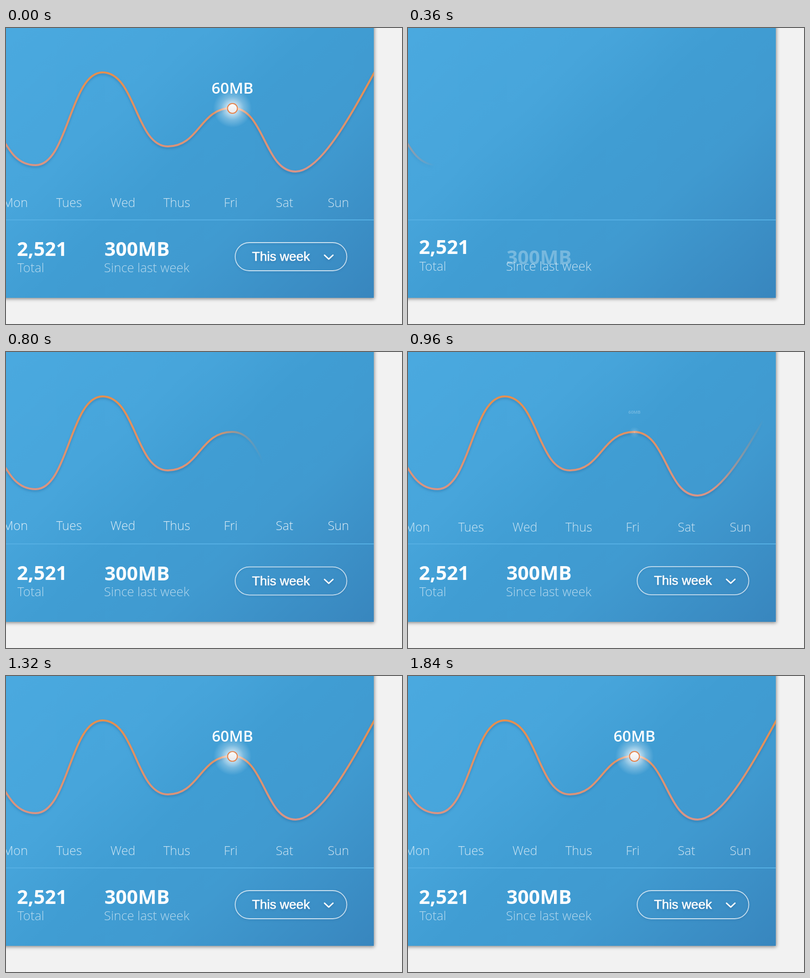
Recreate the animation shown at these times as an HTML page. Size 800 px wide and 600 px high, loop 2080 ms.

```html
<!DOCTYPE html>
<html lang="en">
<head>
<meta charset="utf-8">
<title>Weekly usage</title>
<style>
  html, body { margin: 0; width: 100%; height: 100%; overflow: hidden; background: #f2f2f2; }
  .card {
    position: absolute; left: -20px; top: -20px; width: 763px; height: 567px;
    overflow: hidden; box-shadow: 1px 2px 7px rgba(0, 0, 0, .45);
  }
  .card svg { position: absolute; left: 20px; top: 20px; width: 743px; height: 547px; }
  .line {
    --edge: 2000px;
    -webkit-mask-image: linear-gradient(90deg, #000 calc(var(--edge) - 100px), transparent var(--edge));
    mask-image: linear-gradient(90deg, #000 calc(var(--edge) - 100px), transparent var(--edge));
  }
  .line path {
    fill: none; stroke: url(#warm); stroke-width: 4;
    filter: drop-shadow(0 3px 2px rgba(25, 75, 125, .3));
  }
  text { fill: #fff; font-family: "Open Sans", "Noto Sans", sans-serif; }
  .days text { font-size: 25px; font-weight: 300; text-anchor: middle; }
  .label { font-size: 25.5px; font-weight: 300; }
  .figure { font-size: 39.5px; font-weight: 700; }
  .value { font-size: 31px; font-weight: 600; text-anchor: middle; }
  .button { filter: drop-shadow(0 2px 2px rgba(20, 60, 110, .25)); }
  .button text {
    font: 26px "Liberation Sans", Arial, sans-serif;
    stroke: #fff; stroke-width: .6px;
  }
  .button rect { fill: none; stroke: #fff; stroke-opacity: .72; stroke-width: 1.8; }
  .button path { fill: none; stroke: #fff; stroke-width: 2.8; stroke-linecap: round; stroke-linejoin: round; }
</style>
</head>
<body>
<div class="card">
  <svg viewBox="0 0 743 547">
    <defs>
      <linearGradient id="sky" gradientUnits="userSpaceOnUse" x1="0" y1="0" x2="613" y2="667">
        <stop offset="0" stop-color="#4aa9df"/>
        <stop offset=".3" stop-color="#47a5db"/>
        <stop offset=".48" stop-color="#409dd3"/>
        <stop offset=".67" stop-color="#409ad0"/>
        <stop offset="1" stop-color="#3886be"/>
      </linearGradient>
    </defs>
    <rect width="743" height="547" fill="url(#sky)"/>
    <rect y="388" width="743" height="2" fill="#55afe3"/>
  </svg>

  <svg class="line" viewBox="0 0 743 547">
    <defs>
      <linearGradient id="warm" gradientUnits="userSpaceOnUse" x1="0" y1="90" x2="0" y2="292">
        <stop offset="0" stop-color="#e58f4f"/>
        <stop offset="1" stop-color="#d89588"/>
      </linearGradient>
    </defs>
    <path d="M-20 200C8 255 25 278 60 278C125 278 130 90 195 90C262 90 262 240 327 240C391 240 391 162 457 162C522 162 522 291 585 291C635 291 695 180 748 83"/>
  </svg>

  <svg viewBox="0 0 743 547">
    <defs>
      <radialGradient id="glow">
        <stop offset=".2" stop-color="#fff" stop-opacity=".75"/>
        <stop offset=".6" stop-color="#fff" stop-opacity=".28"/>
        <stop offset="1" stop-color="#fff" stop-opacity="0"/>
      </radialGradient>
      <linearGradient id="pearl" x2="0" y2="1">
        <stop offset="0" stop-color="#fff"/>
        <stop offset="1" stop-color="#e9e9ec"/>
      </linearGradient>
    </defs>

    <g class="days" data-rise="480" data-alpha=".75"></g>

    <text class="figure" x="22" y="462" data-rise="120">2,521</text>
    <text class="label" x="23" y="495" data-rise="170" data-alpha=".62">Total</text>
    <text class="figure" x="199" y="462" data-rise="300">300MB</text>
    <text class="label" x="198" y="495" data-rise="170" data-alpha=".62">Since last week</text>

    <g class="button" data-rise="360">
      <rect x="463" y="435" width="225.5" height="57" rx="28.5"/>
      <text x="497" y="472">This week</text>
      <path d="M643.5 460.5L652 468.5L660.500 460.5"/>
    </g>

    <g data-pop="900" data-origin="457.5 163">
      <circle cx="457.5" cy="163" r="39" fill="url(#glow)"/>
      <circle cx="457.5" cy="163" r="10" fill="url(#pearl)" stroke="#e5834c" stroke-width="2"/>
    </g>
    <g data-pop="900" data-origin="457.5 122">
      <text class="value" x="457.5" y="133">60MB</text>
    </g>
  </svg>
</div>

<script>
const LOOP = 2080, STEP = 40, DROP = 24;
const $$ = s => [...document.querySelectorAll(s)];
const line = document.querySelector('.line');

document.querySelector('.days').innerHTML =
  ['Mon', 'Tues', 'Wed', 'Thus', 'Fri', 'Sat', 'Sun']
    .map((day, i) => `<text x="${18.7 + i * 108.8}" y="363">${day}</text>`).join('');

const risers = $$('[data-rise]'), poppers = $$('[data-pop]');

// Underdamped spring from 0 to 1, peaking 240 ms after its start
function spring(ms) {
  if (ms <= 0) return 0;
  const w = Math.PI / 240, damp = .564;
  return 1 - Math.exp(-damp * w * ms) * (Math.cos(w * ms) + damp * Math.sin(w * ms));
}

// Right end of the drawn line: a sine ease with a straight lead-in
function lineEdge(t) {
  if (t < 360) return 54 + .5 * (t - 360);
  return 479 + 462 * Math.sin(Math.min((t - 770) / 350, Math.PI / 2));
}

function draw(t) {
  for (const el of risers) {
    const p = spring(t - el.dataset.rise);
    el.setAttribute('transform', `translate(0 ${(1 - p) * DROP})`);
    el.style.opacity = Math.min(1, p * (el.dataset.alpha || 1));
  }
  for (const el of poppers) {
    const p = spring(t - el.dataset.pop);
    const [x, y] = el.dataset.origin.split(' ');
    el.setAttribute('transform', `translate(${x} ${y}) scale(${p}) translate(${-x} ${-y})`);
    el.style.opacity = Math.min(1, p);
  }
  line.style.setProperty('--edge', lineEdge(t) + 'px');
}

const start = performance.now();
function tick() {
  const t = Math.floor(((performance.now() - start) % LOOP) / STEP) * STEP;
  draw(t < STEP ? LOOP : t); // the loop opens on the finished chart
  requestAnimationFrame(tick);
}
tick();
</script>
</body>
</html>
```
